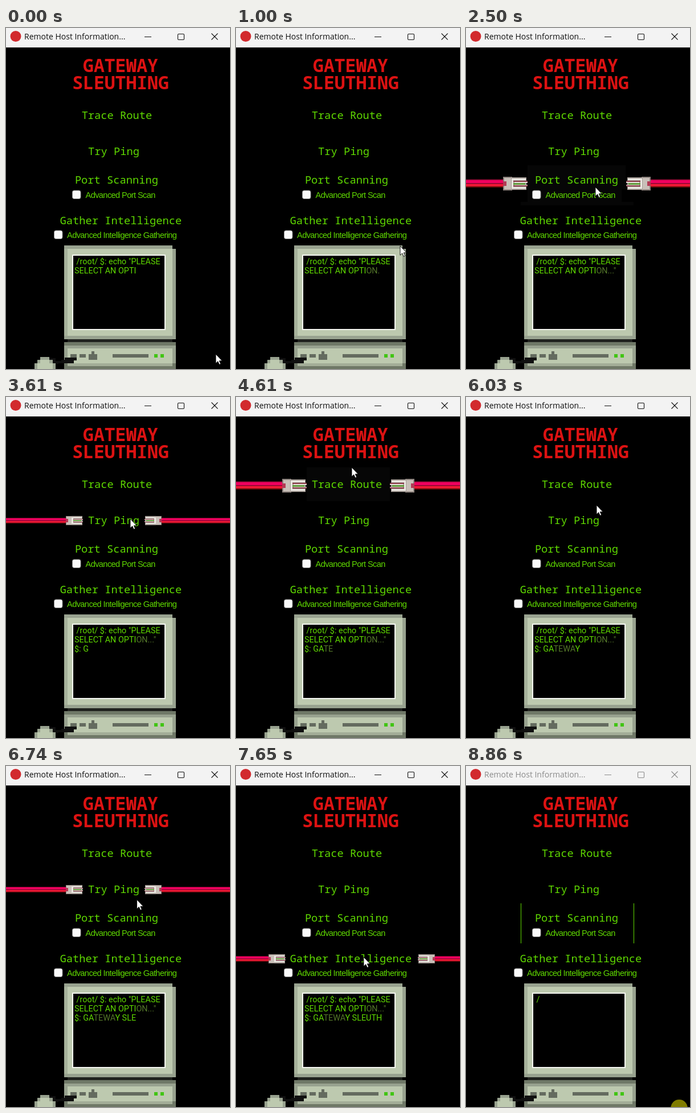
Write an HTML page that moves like this. It is 393 px wide and 596 px high and loops after 8.96 s.

```html
<!DOCTYPE html>
<html lang="en">
<head>
<meta charset="utf-8">
<title>Remote Host Information</title>
<style>
  html, body { margin: 0; width: 100%; height: 100%; overflow: hidden; background: #000; }
  svg { display: block; width: 393px; height: 596px; }
  text { white-space: pre; }
  .caption { font: 14px "Open Sans", sans-serif; }
  .brand { font: 600 31.4px "Noto Sans Mono", monospace; fill: #dc1212; text-anchor: middle; }
  .item { font: 18.75px "Noto Sans Mono", monospace; fill: #5fd900; text-anchor: middle; }
  .option { font: 14.6px "Liberation Sans", sans-serif; letter-spacing: -.6px; fill: #5fd900; }
  .term { font: 14.4px Roboto, sans-serif; fill: #5fd900; }
  .dim { fill: #55782a; }
  .box { fill: #f9f9f9; stroke: #8c8c8c; }
</style>
</head>
<body>
<svg viewBox="0 0 393 596">
  <defs>
    <g id="plug" shape-rendering="crispEdges">
      <path fill="#8b817c" d="M0 1H16V25H0Z"/>
      <path fill="#c9c0b9" d="M2 3H14V23H2Z"/>
      <path fill="#b33a55" d="M0 9H6V17H0Z"/>
      <path fill="#a59d97" d="M14 2H41V24H14Z"/>
      <path fill="#ece8e2" d="M15 4H40V7H15ZM15 19H40V22H15ZM15 7H18V19H15Z"/>
      <path fill="#8c3a48" d="M18 8H43V10H18ZM18 16H43V18H18Z"/>
      <path fill="#e6e0da" d="M20 10H43V12H20ZM20 15H43V16H20Z"/>
      <path fill="#5f9a3a" d="M18 12H39V15H18Z"/>
    </g>
  </defs>
  <rect width="393" height="596"/>
  <rect width="393" height="34" fill="#f3f3f3"/>
  <circle cx="17" cy="14.500" r="9.500" fill="#d22a2e"/>
  <g id="bar">
    <text class="caption" x="32" y="20" fill="currentColor">Remote Host Information...</text>
    <path d="M243 15.500H255M360.500 9.500L371.500 20.500M371.500 9.500L360.500 20.500" fill="none" stroke="currentColor" stroke-width="1.100"/>
    <rect x="301.500" y="10.500" width="11" height="10" rx="1.500" fill="none" stroke="currentColor" stroke-width="1.100"/>
  </g>
  <text class="brand" x="201" y="77">GATEWAY</text>
  <text class="brand" x="201" y="107">SLEUTHING</text>

  <g id="cables"></g>

  <text class="item" x="194.500" y="159">Trace Route</text>
  <text class="item" x="189" y="222">Try Ping</text>
  <text class="item" x="194" y="272">Port Scanning</text>
  <text class="item" x="201.500" y="343">Gather Intelligence</text>
  <rect class="box" x="116.500" y="284" width="14.500" height="14.500" rx="3"/>
  <rect class="box" x="84.500" y="354" width="14.500" height="14.500" rx="3"/>
  <text class="option" x="139.500" y="297">Advanced Port Scan</text>
  <text class="option" x="107" y="367">Advanced Intelligence Gathering</text>
  <path id="focus" d="M96.500 240V310M294.500 240V310" stroke="#5fd900" fill="none"/>

  <g shape-rendering="crispEdges">
    <path fill="#98a28f" d="M102 380H292V386H298V544H102Z"/>
    <path fill="#bdc9af" d="M108 386H292V538H108Z"/>
    <path fill="#a6b19b" d="M102 386H108V538H102Z"/>
    <path fill="#f4f6f0" d="M116 396H280V528H116Z"/>
    <path fill="#000" d="M118 398H278V526H118Z"/>
    <path fill="#20221e" d="M108 544H292V549H108Z"/>
    <path fill="#6f7867" d="M102 549H298V596H102Z"/>
    <path fill="#98a28f" d="M102 555H298V586H102Z"/>
    <path fill="#bdc9af" d="M108 560H292V586H108Z"/>
    <path fill="#a3ad98" d="M108 586H292V591H108Z"/>
    <path fill="#646b5f" d="M113 570H124V576H113ZM129 570H140V576H129ZM145 570H150V565H155V570H160V580H145ZM187 570H250V576H187Z"/>
    <path fill="#41c414" d="M260 570H266V576H260ZM271 570H277V576H271Z"/>
    <path fill="#101010" d="M76 577H87V582H97V580H103V576H124V581H119V586H92V587H82V582H76Z"/>
    <path fill="#98a28f" d="M60 575H76V580H82V586H87V596H50V586H55V580H60Z"/>
    <path fill="#bdc9af" d="M60 580H76V586H82V596H55V586H60Z"/>
  </g>

  <text class="term" x="120" y="413"></text>
  <text class="term" x="120" y="429"></text>
  <text class="term" x="120" y="445"></text>

  <circle id="click" cx="374" cy="598" r="15" fill="#807c00"/>
  <path id="cursor" d="M0 0V16.200L3.700 12.700L6.200 18.300L8.700 17.200L6.300 11.800H11.300Z" fill="#fff" stroke="#000" stroke-width=".9"/>
</svg>
<script>
const LOOP = 8960, STEP = 100, RESET = 8800;
const $ = id => document.getElementById(id);
const rows = [...document.querySelectorAll('.term')];

// inner left, inner right, middle, height of each hover cable
const buttons = {
  trace: [124, 270, 154.5, 26],
  ping: [135, 243, 216, 18],
  port: [108, 281, 271.5, 26],
  gather: [87, 319, 337, 18]
};
const panels = {
  trace: 'M124 123H270V182H124Z',
  port: 'M108 240H280V282H273V304H294V310H96V304H108Z'
};
const hovers = [
  [1200, 1900, 'gather'], [2000, 2800, 'port'], [2900, 4000, 'ping'],
  [4100, 4700, 'trace'], [5400, 5800, 'trace'], [6300, 6800, 'ping'],
  [6900, 7200, 'port'], [7400, 7900, 'gather']
];
// time, x, y
const path = [
  [0, 368, 570], [1000, 288, 381], [1400, 255, 345], [1900, 237, 318],
  [2500, 227, 278], [2700, 225, 262], [3300, 218, 213], [3700, 218, 213],
  [4300, 207, 148], [4400, 207, 148], [4600, 203, 123], [4900, 202, 98],
  [5300, 214, 142], [5600, 223, 166], [5700, 223, 166], [6000, 229, 189],
  [6600, 230, 222], [7100, 228, 280], [7500, 224, 334], [7800, 224, 334],
  [8500, 372, 586]
];
const stripes = [[0, '#8f0a35'], [.1, '#f0005f'], [.48, '#b00840'], [.58, '#f81838'], [.88, '#8a1010']];

function cable([l, r, y, h], panel) {
  const w = h > 20 ? 43 : 30, top = y - h / 2;
  const sx = w / 43, sy = h / 26, band = h * .54;
  const lines = stripes.map(([at, color], i) => {
    const [end] = stripes[i + 1] || [1];
    const y0 = y - band / 2 + at * band, y1 = y0 + (end - at) * band;
    return `<path fill="${color}" d="M0 ${y0}H${l - w}V${y1}H0ZM${r + w} ${y0}H393V${y1}H${r + w}Z"/>`;
  }).join('');
  return (panel ? `<path fill="#060606" d="${panel}"/>` : '') + lines +
    `<use href="#plug" transform="translate(${l - w} ${top}) scale(${sx} ${sy})"/>` +
    `<use href="#plug" transform="translate(${r + w} ${top}) scale(${-sx} ${sy})"/>`;
}

for (const name in buttons) {
  const g = document.createElementNS('http://www.w3.org/2000/svg', 'g');
  g.id = name;
  g.innerHTML = cable(buttons[name], panels[name]);
  $('cables').append(g);
}

const show = (el, on) => el.setAttribute('visibility', on ? 'visible' : 'hidden');

function pointer(t) {
  const i = path.findIndex(p => p[0] > t);
  if (i < 0) return path[path.length - 1].slice(1);
  const [t0, x0, y0] = path[i - 1], [t1, x1, y1] = path[i];
  const k = (t - t0) / (t1 - t0);
  return [x0 + (x1 - x0) * k, y0 + (y1 - y0) * k];
}

const fade = (s, from, to = s.length) =>
  `${s.slice(0, from)}<tspan class="dim">${s.slice(from, to)}</tspan>${s.slice(to)}`;

function type(t) {
  const n = Math.floor((t - 3600) / 306);
  const done = t >= RESET;
  rows[0].textContent = done ? ' /' : ' /root/ $: echo "PLEASE';
  rows[1].innerHTML = done ? '' : fade('SELECT AN OPTION..."'.slice(0, n + 26), 14);
  rows[2].innerHTML = done ? '' : fade('$: GATEWAY SLEUTHING'.slice(0, Math.max(0, n + 4)), 5, 9);
}

let last = -1;
function draw(now) {
  const t = Math.min(Math.floor(now % LOOP / STEP) * STEP, RESET);
  if (t === last) return;
  last = t;
  const done = t >= RESET;
  const hit = hovers.find(([a, b]) => t >= a && t < b);
  for (const name in buttons) show($(name), hit && hit[2] === name);
  type(t);
  $('cursor').setAttribute('transform', `translate(${pointer(t)})`);
  show($('cursor'), !done);
  show($('click'), done);
  show($('focus'), done);
  $('bar').style.color = done ? '#8b8b8b' : '#111';
}

const start = performance.now();
function tick() {
  draw(performance.now() - start);
  requestAnimationFrame(tick);
}
tick();
</script>
</body>
</html>
```
